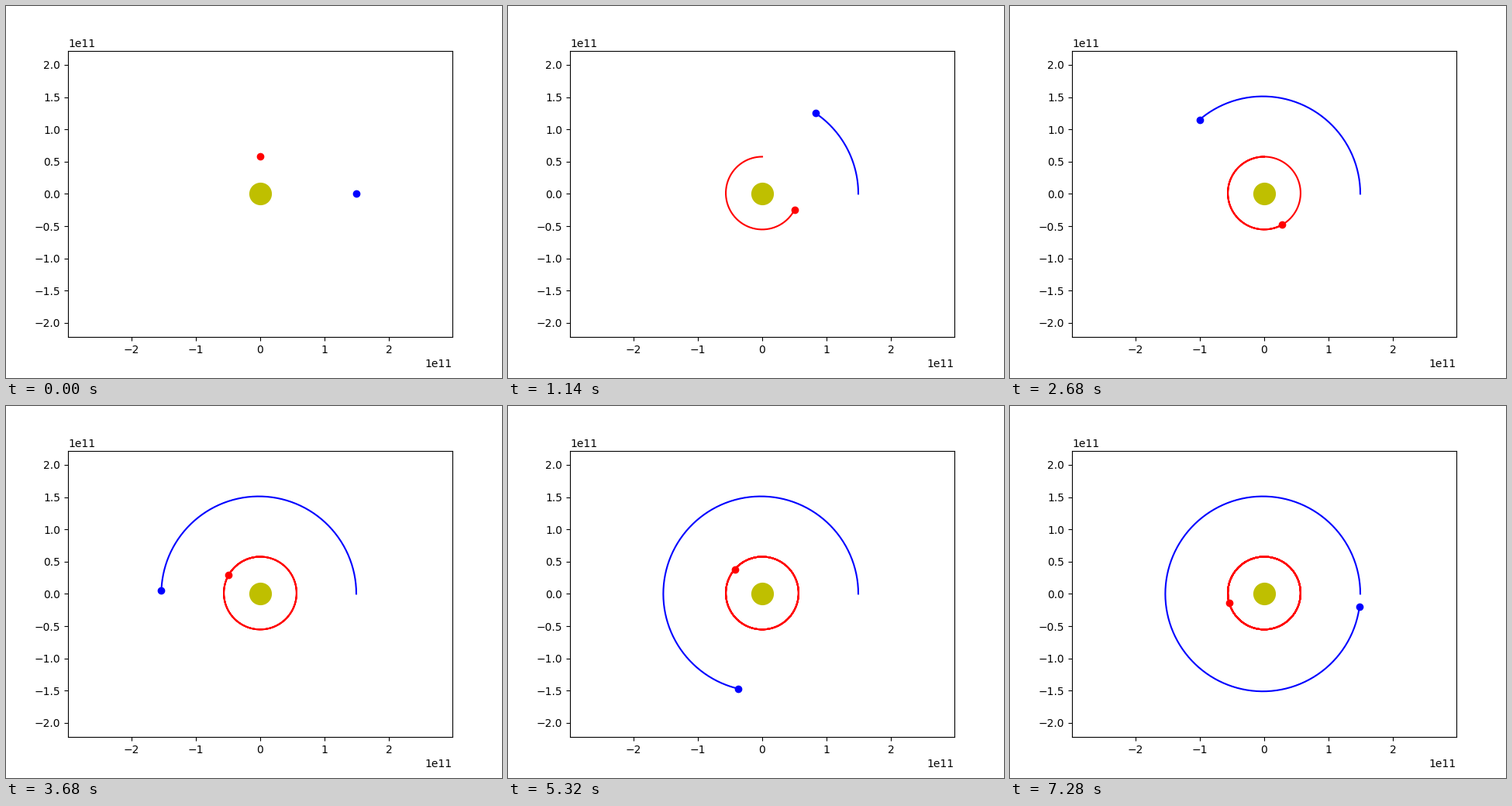
Animation, 640 px wide and 480 px high, one loop 7.3 s. Source, as a matplotlib script:

```python
import numpy as np
import matplotlib.pyplot as plt
from matplotlib.animation import FuncAnimation

GM = 1.322e20      # m^3 / s^2
DAYS = 365
SUBSTEPS = 24
DT = 86400 / SUBSTEPS
SPAN = 2.98e11


def accel(pos):
    return -GM * pos / np.hypot(*pos) ** 3


def orbit(pos, vel):
    """Daily positions of a body around the origin (velocity Verlet)."""
    pos, vel = np.array(pos, float), np.array(vel, float)
    path = [pos.copy()]
    acc = accel(pos)
    for _ in range(DAYS - 1):
        for _ in range(SUBSTEPS):
            vel += acc * DT / 2
            pos += vel * DT
            acc = accel(pos)
            vel += acc * DT / 2
        path.append(pos.copy())
    return np.array(path)


fig, ax = plt.subplots(figsize=(6.4, 4.8), dpi=100)
height = SPAN * (0.77 * 480) / (0.775 * 640)
ax.set_xlim(-SPAN, SPAN)
ax.set_ylim(-height, height)

ax.plot(0, 0, "yo", markersize=20)
bodies = []
for color, pos, vel in [("b", (1.49e11, 0), (0, 30000)),
                        ("r", (0, 5.76e10), (-47400, 0))]:
    trail, = ax.plot([], [], color + "-")
    dot, = ax.plot([], [], color + "o")
    bodies.append((orbit(pos, vel), trail, dot))


def update(day):
    for path, trail, dot in bodies:
        trail.set_data(*path[:day + 1].T)
        dot.set_data(*path[day:day + 1].T)
    return [artist for body in bodies for artist in body[1:]]


anim = FuncAnimation(fig, update, frames=DAYS, interval=20,
                     repeat=True, repeat_delay=0)
plt.show()
```
